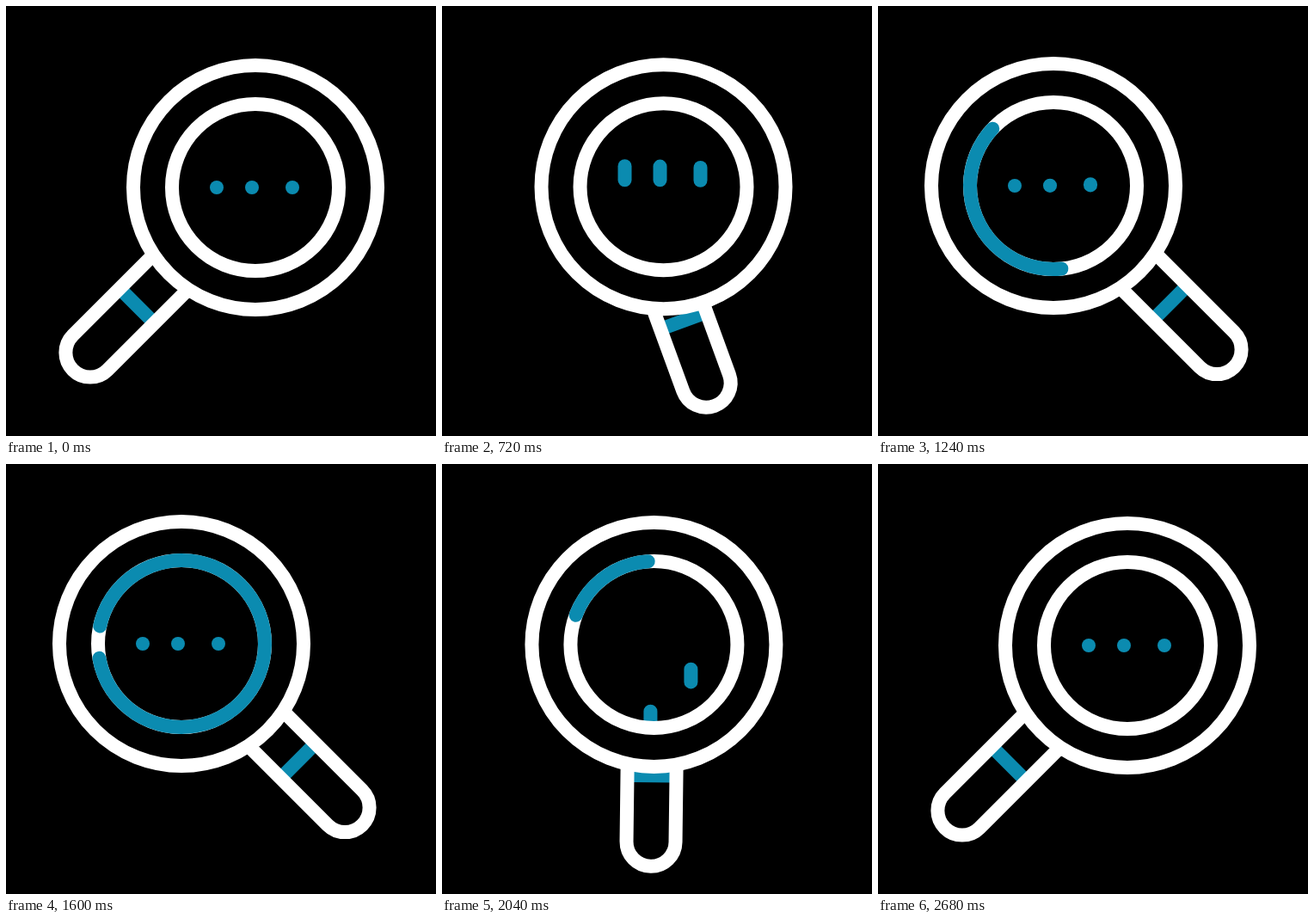
Animation of 500 by 500 pixels, one loop 3 s. Source, as an HTML page with a canvas:

```html
<!DOCTYPE html>
<html lang="en">
<head>
<meta charset="utf-8">
<title>Searching</title>
<style>
  html, body { margin: 0; width: 100%; height: 100%; overflow: hidden; background: #000; }
  canvas { display: block; width: 100vw; height: 100vh; }
</style>
</head>
<body>
<canvas id="stage" width="500" height="500"></canvas>
<script>
const ctx = document.getElementById('stage').getContext('2d');
const LOOP = 3000, STEP = 40;
const WHITE = '#fff', BLUE = '#0b8bb0';
const RAD = Math.PI / 180;

const clamp = v => Math.min(1, Math.max(0, v));
const mix = (a, b, p) => a + (b - a) * p;

// Cubic bezier easing with control points (x1, 0) and (x2, 1).
const ease = (x1, x2) => x => {
  if (x <= 0 || x >= 1) return clamp(x);
  let lo = 0, hi = 1;
  for (let i = 0; i < 24; i++) {
    const s = (lo + hi) / 2, r = 1 - s;
    if (3 * s * r * r * x1 + 3 * s * s * r * x2 + s ** 3 < x) lo = s; else hi = s;
  }
  return lo * lo * (3 - 2 * lo);
};

const easing = {
  lensGo: ease(.79, .3), lensBack: ease(.61, .19),
  gripGo: ease(.56, .28), gripBack: ease(.74, .05),
  turnGo: ease(.75, .1), turnBack: ease(.67, .12),
  dot: ease(.59, .2),
  spin: ease(.2, .31), head: ease(.55, .62), tail: ease(.1, .2)
};

const span = (t, from, len, name) => easing[name](clamp((t - from) / len));

// 0 at the resting pose, 1 at the far side, then back to 0.
const sweep = (t, part) =>
  t < 1600 ? span(t, 200, 1040, part + 'Go') : 1 - span(t, 1600, 1040, part + 'Back');

function stroke(color, build, cap = 'butt') {
  ctx.beginPath();
  build();
  ctx.strokeStyle = color;
  ctx.lineWidth = 16;
  ctx.lineCap = cap;
  ctx.stroke();
}

function drawHandle(t) {
  const q = sweep(t, 'grip');
  const dip = (t < 1600 ? 36 : 4) * q * (1 - q);
  ctx.save();
  ctx.translate(mix(187, 305, q), mix(314, 310.5, q) + dip);
  ctx.rotate(mix(45, -45, sweep(t, 'turn')) * RAD);
  stroke(BLUE, () => { ctx.moveTo(-24, 49); ctx.lineTo(24, 49); });
  stroke(WHITE, () => {
    ctx.moveTo(28.5, -8);
    ctx.arc(0, 126, 28.5, 0, Math.PI);
    ctx.lineTo(-28.5, -8);
  });
  ctx.restore();
}

// Centre offset and stretch of dot i: a stretch upwards, then a fall and re-entry from above.
function dotPose(t, i) {
  const lag = 80 * i;
  if (t < 1600) {
    const k = span(t, 200 + lag, 520, 'dot') - span(t, 720 + lag, 520, 'dot');
    return [-16 * k, 16 * k];
  }
  const fall = (t - 1600 - lag) / 420;
  if (fall <= 0) return [0, 0];
  let y, v;
  if (fall < 1) {
    y = 146 * fall ** 3.45;
    v = 3.45 * 146 / 420 * fall ** 2.45;
  } else {
    const start = 2070 + lag / 2, len = 2680 - start;
    const left = 1 - clamp((t - start) / len);
    y = -130 * left ** 3.6;
    v = 3.6 * 130 / len * left ** 2.6;
  }
  return [y, Math.min(16, 75 * v * v)];
}

function drawDots(t) {
  ctx.save();
  ctx.beginPath();
  ctx.arc(0, 0, 92, 0, 2 * Math.PI);
  ctx.clip();
  ctx.fillStyle = BLUE;
  [-45, -4, 43].forEach((x, i) => {
    const [y, len] = dotPose(t, i);
    ctx.beginPath();
    ctx.arc(x, y - len / 2, 8, Math.PI, 0);
    ctx.arc(x, y + len / 2, 8, 0, Math.PI);
    ctx.fill();
  });
  ctx.restore();
}

function drawLens(t) {
  const p = sweep(t, 'lens');
  ctx.save();
  ctx.translate(mix(290, 204, p), mix(211, 209, p));

  // The lens hides whatever part of the handle lies behind it.
  ctx.fillStyle = '#000';
  ctx.beginPath();
  ctx.arc(0, 0, 142, 0, 2 * Math.PI);
  ctx.fill();

  drawDots(t);
  for (const r of [142, 97]) stroke(WHITE, () => ctx.arc(0, 0, r, 0, 2 * Math.PI));

  const spin = mix(-60, 298, span(t, 720, 1960, 'spin'));
  const head = 360 * span(t, 720, 1040, 'head');
  const tail = 360 * span(t, 1600, 900, 'tail');
  if (head - tail > .05) {
    stroke(BLUE, () => ctx.arc(0, 0, 97, (spin + tail) * RAD, (spin + head) * RAD), 'round');
  }
  ctx.restore();
}

function frame() {
  const t = Math.floor(performance.now() % LOOP / STEP) * STEP;
  ctx.fillStyle = '#000';
  ctx.fillRect(0, 0, 500, 500);
  drawHandle(t);
  drawLens(t);
  requestAnimationFrame(frame);
}
frame();
</script>
</body>
</html>
```
